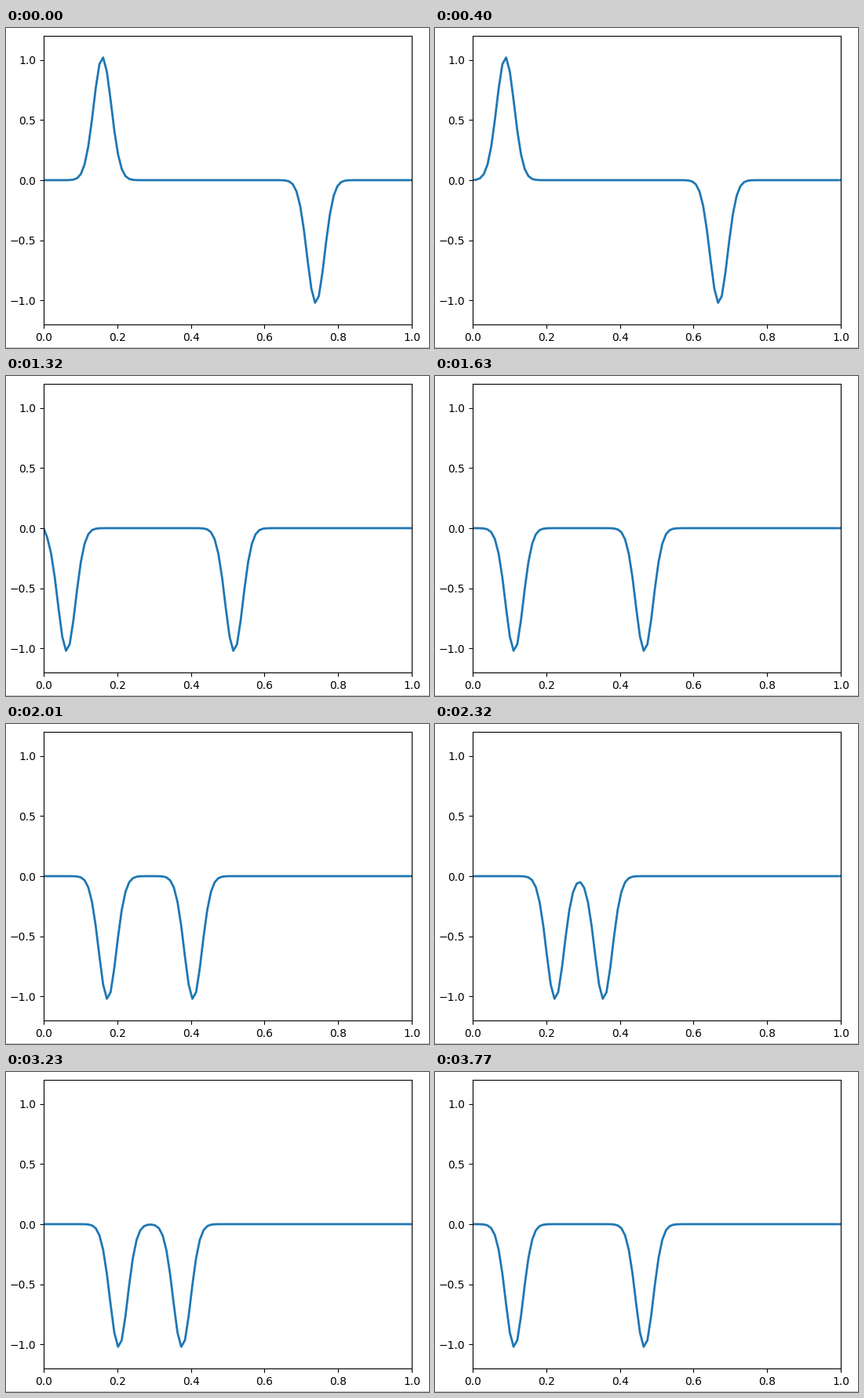
Write a matplotlib script that moves like this. It is 539 px wide and 408 px high and loops after 3870 ms.

```python
import numpy as np
import matplotlib.pyplot as plt
from matplotlib.animation import FuncAnimation
from matplotlib.lines import Line2D

W, H, DPI = 539, 408, 100
LOOP, TICK = 3870, 30
LEFT, RIGHT, TOP, BOTTOM = 48, 517, 10, 378

# String with fixed ends, sampled on 100 points; one cell per time step
N = 100
AMP, SIGMA = 1.023, 2.37
STEP_MS, PHASE = 61, 0.7

# Runs of evenly spaced redraws: first, last, count
RUNS = [(0, 550, 9), (630, 1090, 7), (1160, 1630, 7), (1700, 2160, 7),
        (2240, 2690, 7), (2770, 2990, 4), (3130, 3230, 2), (3300, 3620, 5),
        (3690, 3770, 2)]
redraws = np.round(np.concatenate([np.linspace(*r) for r in RUNS]), -1)

cells = np.arange(N)


def pulse(center):
    return AMP * np.exp(-(cells - center) ** 2 / (2 * SIGMA ** 2))


def wave(step):
    """Two left-moving pulses; each flips sign when it bounces at x = 0."""
    up, down = 15.81 - step, 73.19 - step
    return pulse(up) - pulse(-up) - pulse(down) + pulse(-down)


def step_at(ms):
    shown = redraws[np.searchsorted(redraws, ms, side="right") - 1]
    return int(shown / STEP_MS + PHASE)


plt.rcParams["font.family"] = "DejaVu Sans"
fig = plt.figure(figsize=(W / DPI, H / DPI), dpi=DPI, facecolor="white")
ax = fig.add_axes([LEFT / W, 1 - BOTTOM / H,
                   (RIGHT - LEFT) / W, (BOTTOM - TOP) / H])
ax.set(xlim=(0, 1), ylim=(-1.2, 1.2),
       xticks=np.linspace(0, 1, 6), yticks=np.linspace(-1, 1, 5))
line, = ax.plot(np.linspace(0, 1, N), wave(0), color="#1f77b4", lw=2)

# Thin rule along the window's lower edge
fig.add_artist(Line2D([0, 1], [1 / H, 1 / H], color="#c4c4c4", lw=0.72))


def update(n):
    line.set_ydata(wave(step_at(n * TICK + 20)))
    return line,


anim = FuncAnimation(fig, update, frames=LOOP // TICK, interval=TICK,
                     repeat=True, repeat_delay=0)
plt.show()
```
